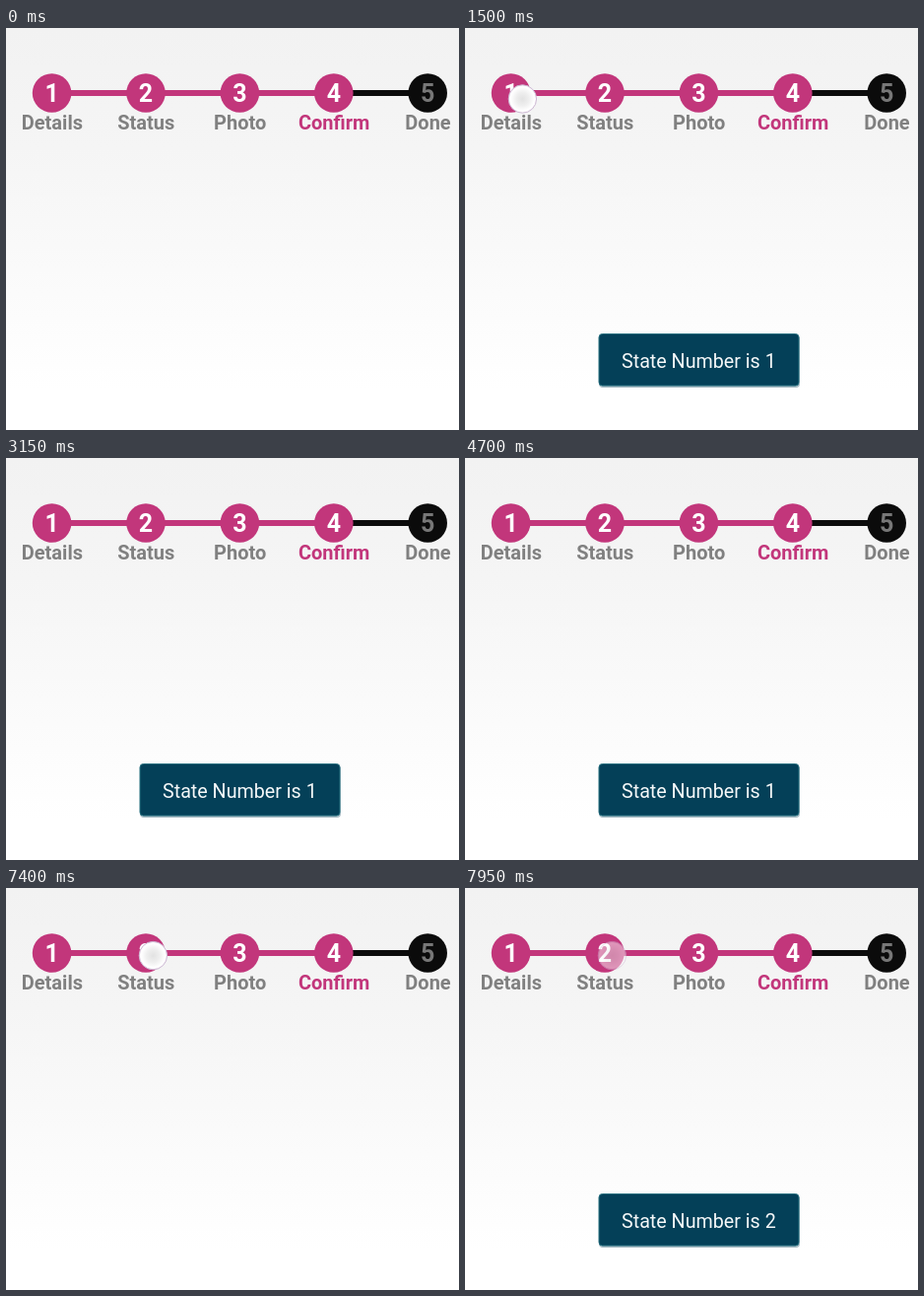
These frames come from a looping animation (460x408 px, 8000 ms). An HTML page:

```html
<!DOCTYPE html>
<html lang="en">
<head>
<meta charset="utf-8">
<title>Step progress</title>
<style>
  html, body { margin: 0; width: 100%; height: 100%; overflow: hidden; }
  body { background: linear-gradient(#f2f2f2, #f5f5f5 30%, #fff 90%); }
  svg { display: block; }
  text { font-family: Roboto, sans-serif; text-anchor: middle; }
  .digit { font-size: 25px; font-weight: 700; }
  .label { font-size: 20px; font-weight: 700; }
</style>
</head>
<body>
<svg width="460" height="408" viewBox="0 0 460 408">
  <defs>
    <radialGradient id="glow">
      <stop offset="0" stop-color="#e2e2e2"/>
      <stop offset=".45" stop-color="#eee"/>
      <stop offset=".85" stop-color="#fff"/>
      <stop offset="1" stop-color="#f8f4f8"/>
    </radialGradient>
  </defs>
  <path d="M46.5 66H333" stroke="#c2367b" stroke-width="6"/>
  <path d="M333 66H428" stroke="#0b0b0b" stroke-width="6"/>
  <g id="steps"></g>
  <circle id="touch" r="14.2" fill="url(#glow)" stroke="#cdb9d4" stroke-width="1"/>
  <g id="toast">
    <rect x="136" y="311.5" width="204" height="53.5" rx="4" fill="#a9bcc5"/>
    <rect x="136" y="310.5" width="203" height="52.5" rx="3.5" fill="#044058" stroke="#246f7f"/>
    <text id="message" x="159" y="344.5" font-size="19.7" fill="#f5f8f9" style="text-anchor:start"></text>
  </g>
</svg>
<script>
const LOOP = 8000, PINK = '#c2367b';
const $ = id => document.getElementById(id);
const clamp = v => Math.max(0, Math.min(1, v));

$('steps').innerHTML = ['Details', 'Status', 'Photo', 'Confirm', 'Done'].map((name, i) => {
  const x = 46.6 + i * 95.4, done = i < 4;
  return `<circle cx="${x}" cy="66" r="19.8" fill="${done ? PINK : '#0b0b0b'}"/>
    <text class="digit" x="${x}" y="74.5" fill="${done ? '#fff' : '#777'}">${i + 1}</text>
    <text class="label" x="${x + .3}" y="103.3" fill="${i === 3 ? PINK : '#808080'}">${name}</text>`;
}).join('');

const taps = [
  { step: 1, x: 58.4, y: 72, down: 1150, up: 1750, toast: 1200, hide: 6150 },
  { step: 2, x: 149.4, y: 68.6, down: 7400, up: 7600, toast: 7500, hide: LOOP }
];

function draw(now) {
  const t = now % LOOP;
  const tap = taps[t < 7000 ? 0 : 1];
  const touch = $('touch');
  touch.setAttribute('cx', tap.x);
  touch.setAttribute('cy', tap.y);
  touch.setAttribute('opacity', t < tap.down ? 0 : clamp(1 - (t - tap.up) / 800) ** 1.3);
  $('toast').setAttribute('opacity', t < tap.hide ? clamp((t - tap.toast) / 300) : 0);
  $('message').textContent = 'State Number is ' + tap.step;
}

const start = performance.now();
function tick() {
  draw(performance.now() - start);
  requestAnimationFrame(tick);
}
tick();
</script>
</body>
</html>
```
